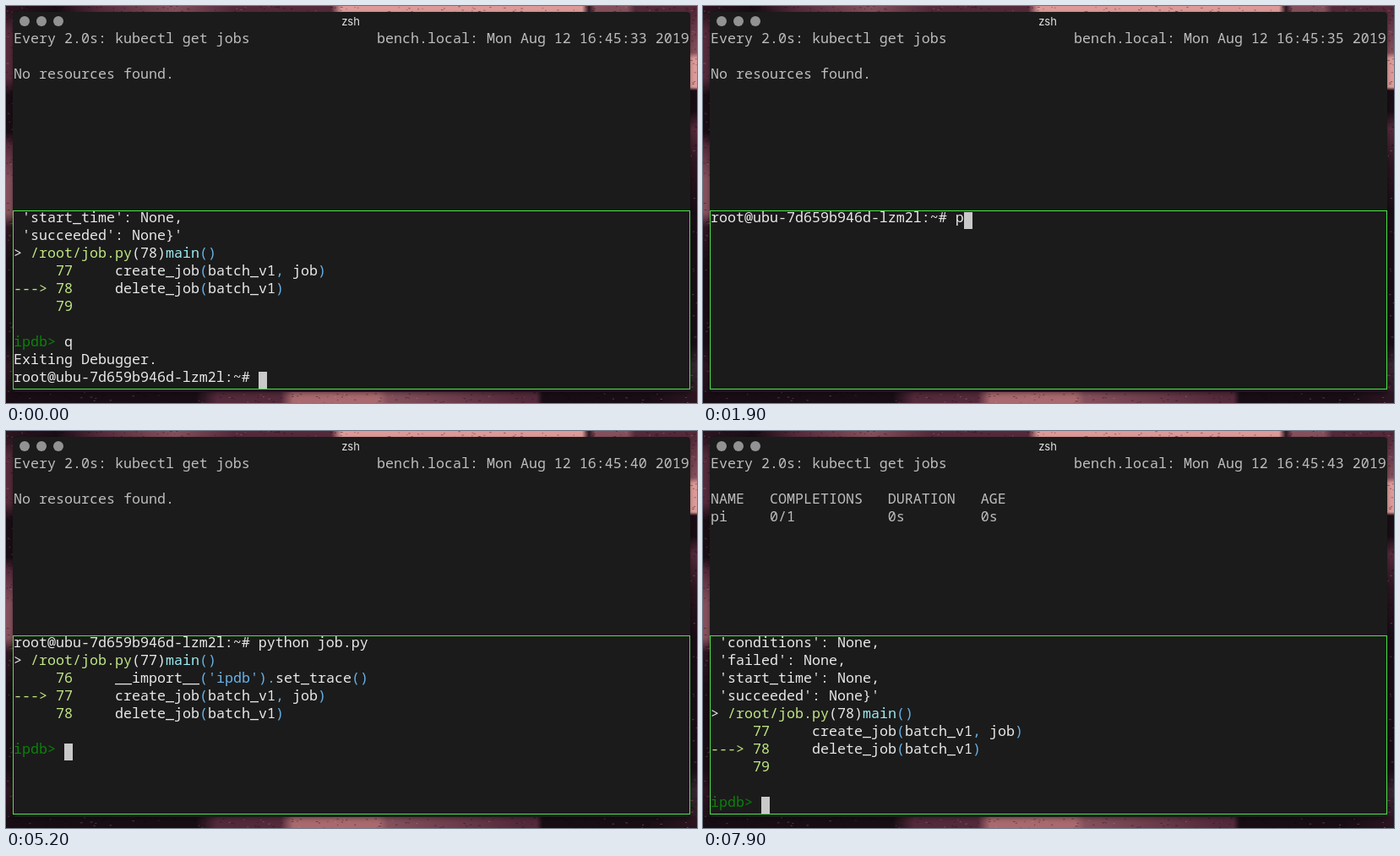
Animation, 818 px wide and 470 px high, one loop 8000 ms. Source, as an HTML page with a canvas:

```html
<!DOCTYPE html>
<html lang="en">
<head>
<meta charset="utf-8">
<title>Terminal session</title>
<style>
html, body { margin: 0; width: 100%; height: 100%; overflow: hidden; background: #1b0d17; }
canvas { display: block; }
</style>
</head>
<body>
<canvas id="stage" width="818" height="470"></canvas>
<script>
const W = 818, H = 470, LOOP = 8000;
const LEFT = 9, CELL = 10, ROW = 21, TOP_PANE = 31, LOW_PANE = 243;
const ctx = document.getElementById('stage').getContext('2d');

const C = {
  dim: '#bdbdbd', text: '#e8e8e8', file: '#bfe683', name: '#9cebf0',
  op: '#67b2e8', prompt: '#0b800b', border: '#4be447', window: '#1b1b1b'
};

function seeded(seed) {
  return () => (seed = (seed * 16807) % 2147483647) / 2147483647;
}

// Wallpaper: painted strips around the window, with fine speckles
function makeWallpaper() {
  const layer = document.createElement('canvas');
  layer.width = W;
  layer.height = H;
  const g = layer.getContext('2d');
  const dark = '#190d15', plum = '#2b1520', wine = '#54293a', rose = '#85505c', pink = '#dd9a98';

  function strip(x, y, w, h, stops) {
    const wide = w > h;
    const grad = g.createLinearGradient(x, y, wide ? x + w : x, wide ? y : y + h);
    for (const [at, color] of stops) grad.addColorStop((at - (wide ? x : y)) / (wide ? w : h), color);
    g.fillStyle = grad;
    g.fillRect(x, y, w, h);
  }

  strip(0, 0, W, 8, [
    [0, plum], [60, dark], [110, wine], [200, rose], [270, wine], [385, wine], [397, pink],
    [682, pink], [690, plum], [698, rose], [735, rose], [745, wine], [818, wine]
  ]);
  strip(0, 8, 9, 462, [
    [8, plum], [30, wine], [85, wine], [105, dark], [150, dark], [165, wine], [205, rose],
    [245, rose], [262, plum], [310, dark], [400, dark], [425, plum], [470, dark]
  ]);
  strip(809, 8, 9, 462, [
    [8, wine], [55, rose], [62, pink], [96, pink], [100, dark], [125, dark], [145, wine],
    [185, plum], [240, dark], [400, dark], [425, '#34252e'], [470, plum]
  ]);
  strip(0, 456, W, 14, [
    [0, dark], [225, dark], [250, wine], [325, wine], [340, '#a9696e'], [440, '#a9696e'],
    [452, rose], [610, wine], [628, wine], [635, dark], [760, dark], [818, plum]
  ]);

  const rnd = seeded(71);
  for (let i = 0; i < 520; i++) {
    const side = rnd(), x = rnd() * W, y = rnd() * H;
    const px = side < 0.6 ? x : (side < 0.8 ? rnd() * 8 : 810 + rnd() * 8);
    const py = side < 0.25 ? rnd() * 7 : (side < 0.6 ? 457 + rnd() * 13 : y);
    g.fillStyle = rnd() < 0.8 ? 'rgba(18,7,14,.4)' : 'rgba(215,165,172,.3)';
    g.fillRect(px, py, 1 + rnd() * 2, 1);
  }

  g.shadowColor = 'rgba(0,0,0,.35)';
  g.shadowBlur = 5;
  g.shadowOffsetY = 2;
  g.fillStyle = C.window;
  g.beginPath();
  g.roundRect(8, 7, 802, 450, 4);
  g.fill();
  return layer;
}

const wallpaper = makeWallpaper();

// Lower pane lines are lists of [text, color] runs
const line = text => [[text, C.text]];
const at = n => [['> ', C.text], ['/root/job.py', C.file], [`(${n})`, C.text], ['main', C.name], ['()', C.op]];
const ipdb = (typed = '') => [['ipdb> ', C.prompt], [typed, C.text]];
const shell = (typed = '') => line('root@ubu-7d659b946d-lzm2l:~# ' + typed);

function code(n, source, current) {
  const runs = [[(current ? '---> ' : '     ') + n, C.file], ['     ', C.text]];
  for (const part of source.match(/'\w+'|\w+|\W/g)) {
    runs.push([part, /^\w/.test(part) ? C.text : C.op]);
  }
  return runs;
}

const trace = "__import__('ipdb').set_trace()";
const create = 'create_job(batch_v1, job)';
const remove = 'delete_job(batch_v1)';

const atDelete = [
  line(" 'start_time': None,"), line(" 'succeeded': None}'"), at(78),
  code(77, create), code(78, remove, true), code(79, ' '), line('')
];
const atCreate = [
  shell('python job.py'), at(77),
  code(76, trace), code(77, create, true), code(78, remove), line('')
];
const created = [line(" 'conditions': None,"), line(" 'failed': None,"), ...atDelete];

function typed(text, t, start, step) {
  return text.slice(0, Math.max(0, Math.floor((t - start) / step) + 1));
}

function session(t) {
  if (t < 1400) {
    return [...atDelete, ipdb('q'), line('Exiting Debugger.'), shell(typed('clear', t, 500, 100))];
  }
  if (t < 3400) {
    return [shell(t < 2800 ? typed('python j', t, 1900, 100) : 'python job.py ')];
  }
  if (t < 4900) return [shell('python job.py')];
  if (t < 6900) return [...atCreate, ipdb(t < 6400 ? '' : 'n')];
  return [...created, ipdb()];
}

function clock(t) {
  const ticks = [[7000, 43], [4900, 40], [2900, 37], [1200, 35], [0, 33]];
  return ticks.find(([start]) => t >= start)[1];
}

function write(text, col, row, color, top) {
  ctx.fillStyle = color;
  ctx.fillText(text, LEFT + col * CELL, top + row * ROW + 13);
}

function writeLine(runs, row) {
  let col = 0;
  for (const [text, color] of runs) {
    write(text, col, row, color, LOW_PANE);
    col += text.length;
  }
  return col;
}

function drawTitle() {
  ctx.fillStyle = '#929292';
  for (const x of [22, 42, 62]) {
    ctx.beginPath();
    ctx.arc(x, 18, 6, 0, Math.PI * 2);
    ctx.fill();
  }
  ctx.font = '13px Inter, Roboto, sans-serif';
  ctx.textAlign = 'center';
  ctx.fillStyle = '#e2e2e2';
  ctx.fillText('zsh', 408, 23);
  ctx.textAlign = 'left';
}

function drawWatch(t) {
  const put = (text, col, row) => write(text, col, row, C.dim, TOP_PANE);
  put('Every 2.0s: kubectl get jobs', 0, 0);
  put(`bench.local: Mon Aug 12 16:45:${clock(t)} 2019`, 43, 0);
  if (t < 7000) {
    put('No resources found.', 0, 2);
  } else {
    put('NAME   COMPLETIONS   DURATION   AGE', 0, 2);
    put('pi     0/1           0s         0s', 0, 3);
  }
}

function drawSession(t) {
  ctx.strokeStyle = C.border;
  ctx.lineWidth = 1;
  ctx.strokeRect(8.5, 242.5, 801, 211);
  const lines = session(t);
  let end = 0;
  lines.forEach((runs, row) => { end = writeLine(runs, row); });
  const running = t >= 3400 && t < 4900;
  if (!running) {
    ctx.fillStyle = '#c9c9c9';
    ctx.fillRect(LEFT + end * CELL, LOW_PANE + (lines.length - 1) * ROW + 1, CELL, ROW - 1);
  }
}

function draw(now) {
  const t = now % LOOP;
  ctx.drawImage(wallpaper, 0, 0);
  drawTitle();
  ctx.font = '16.667px "Noto Sans Mono", "DejaVu Sans Mono", monospace';
  drawWatch(t);
  drawSession(t);
}

let begun;
function tick(now) {
  begun ??= now;
  draw(now - begun);
  requestAnimationFrame(tick);
}
draw(0);
requestAnimationFrame(tick);
</script>
</body>
</html>
```
